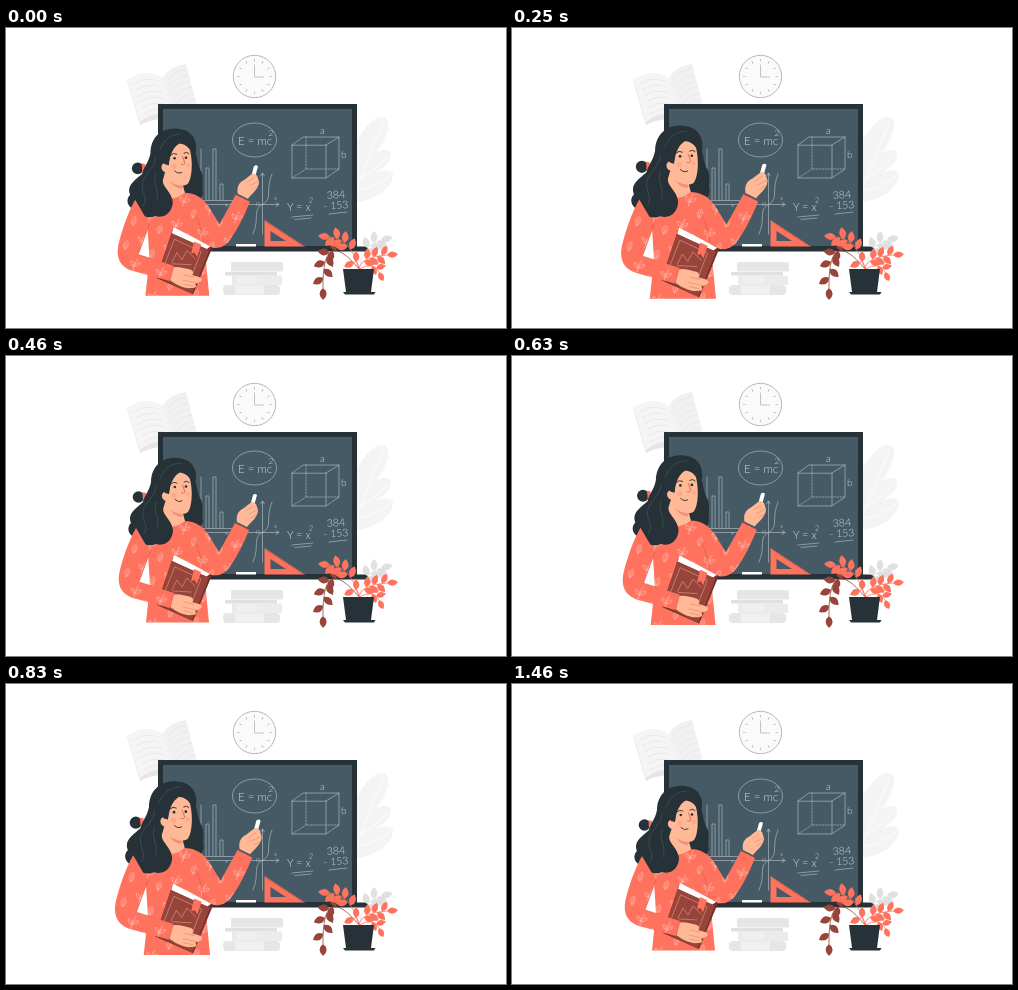
Write an HTML page that moves like this. It is 500 by 300 pixels and loops after 1500 ms.

```html
<!DOCTYPE html>
<html lang="en">
<head>
<meta charset="utf-8">
<title>Teacher at the blackboard</title>
<style>
html, body { margin: 0; width: 100%; height: 100%; overflow: hidden; background: #fff; }
svg { display: block; width: 500px; height: 300px; }
path { stroke-linecap: round; stroke-linejoin: round; }
text { font-family: Lato, sans-serif; font-weight: 300; }
.line { fill: none; }
.skin { fill: #ffb997; }
.fold { fill: none; stroke: #e98c72; stroke-width: .7; }
.seam { fill: none; stroke: #d95a49; stroke-width: .6; }
.dark { fill: #263238; }
.coral { fill: #ff725e; }
</style>
</head>
<body>
<svg viewBox="0 0 500 300">
  <defs>
    <path id="leaf" d="M0 0Q.45-.58 1 0Q.45.58 0 0"/>
    <pattern id="print" width="27" height="25" patternUnits="userSpaceOnUse" patternTransform="rotate(18)">
      <path class="line" stroke="#ffc2b6" stroke-width=".65"
        d="M7 15Q6 8 8 3M7 11Q2 11 2 7Q6 7 7 11Q12 10 12 6Q8 6 7 11M20 23Q15 19 20 14Q24 19 20 23V17"/>
    </pattern>
    <path id="torso" d="M133 173C144 165 158 166 178 165C190 165 197 171 202 178L213 196L229 167L243 174C237 189 231 201 223 212C216 221 207 221 198 216L203 266.500H140L144 229L142 198Z"/>
    <path id="sleeve" d="M130 172C123 184 117 202 114 214C110 230 116 238 127 242L164 252L168 237L133 226L144 196Z"/>
  </defs>

  <!-- open book -->
  <path fill="#e6e6e6" d="M121 53L134 97Q148 89 166 92L160 54Z"/>
  <path fill="#f5f5f5" d="M121 52Q140 39 157 50L168 88Q150 81 134 94Z"/>
  <path fill="#f1f1f1" d="M157 50Q163 38 180 36L191 78L168 88Z"/>
  <g id="pages" class="line" stroke="#e4e4e4" stroke-width=".7"></g>

  <!-- clock -->
  <circle cx="248.5" cy="48.5" r="21.2" fill="#fafafa" stroke="#b0b0b0" stroke-width=".9"/>
  <circle cx="248.5" cy="48.5" r="16.2" class="line" stroke="#999" stroke-width="2.4" pathLength="120" stroke-dasharray=".7 9.3" stroke-dashoffset=".35"/>
  <path class="line" stroke="#bbb" stroke-width=".9" d="M248.500 37V49H257.500"/>

  <!-- large pale leaf -->
  <path fill="#f4f4f4" d="M350 112C358 105 362 91 375 89C385 89 386 102 370 125C378 120 385 121 385 127C384 136 375 142 367 146C377 141 387 141 387 147C386 160 370 172 350 174Z"/>
  <path class="line" stroke="#fff" stroke-width=".8" d="M350 160Q363 130 377 95M354 150Q373 141 381 128M350 163Q373 158 384 148"/>

  <!-- blackboard -->
  <path class="dark" d="M152 76H351V218.500H362V223.500H152Z"/>
  <path fill="#455a64" d="M157 81H346V218H157Z"/>
  <g class="line" stroke="#bac5ca" stroke-width=".6">
    <ellipse cx="248.5" cy="112" rx="22" ry="17"/>
    <path d="M286 117L297 109H333L320 117ZV150H320V117M320 150L333 141V109"/>
    <path stroke-dasharray="1.5 1.5" d="M300 109V141H333M300 141L286 150"/>
    <path d="M195 121V172.500H229M200 172v-32h3v32m4 0v-51h3v51m4 0v-16h3v16"/>
    <path d="M196 176.500H273l-3-2m3 2l-3 2M256.500 206V145l-2 3m2-3l2 3"/>
    <path d="M247 206C254 190 246 182 256.500 176.500S259 163 266 146"/>
    <path d="M286 189l21-2M289 191.500l16-1.500M323 186l18-2"/>
  </g>
  <g fill="#cfd8dc">
    <text x="232" y="116.500" font-size="11.500">E = mc</text>
    <text x="262.500" y="108" font-size="8.500">2</text>
    <text x="314" y="106" font-size="10">a</text>
    <text x="335" y="130" font-size="10">b</text>
    <text x="281" y="183" font-size="11">Y = x</text>
    <text x="303" y="175" font-size="7">2</text>
    <g transform="rotate(-4 321 171)" font-size="10.500"><text x="321" y="171">384</text><text x="317" y="181.500">- 153</text></g>
    <g font-size="6.500"><text x="268" y="172">x</text><text x="219" y="179">x</text><text x="250" y="178">0</text><text x="192" y="179">0</text></g>
  </g>
  <path fill="#fff" d="M230 216H250V218.500H230Z"/>
  <path class="coral" fill-rule="evenodd" d="M258.500 192V218.500H299ZM264.500 203V213H280Z"/>
  <path class="line" stroke="#b04a3d" stroke-width=".7" stroke-dasharray=".7 1.7" d="M260 194L297 218"/>

  <!-- stack of books -->
  <g fill="#e6e6e6">
    <rect x="225" y="234" width="52" height="9.5" rx="1.5"/>
    <rect x="219" y="244" width="52" height="3.5" rx="1" fill="#e0e0e0"/>
    <rect x="226" y="247.5" width="50" height="9.5" rx="1.5" fill="#ebebeb"/>
    <rect x="217" y="257" width="57" height="10" rx="4"/>
    <path fill="#f0f0f0" d="M229 257.500H258V266.500H229ZM231 249H252V255H231Z"/>
  </g>

  <!-- potted plant -->
  <g id="plant"></g>
  <path class="dark" d="M337 241H368L365 264H369.500L368 266.500H339L337 264H340Z"/>

  <g id="teacher">
    <!-- torso and writing arm -->
    <path class="dark" d="M182 116C192 122 190 134 194 142C199 150 195 157 197 165C195 174 187 178 174 179L160 150Z"/>
    <use href="#torso" class="coral"/>
    <use href="#torso" fill="url(#print)"/>
    <path class="seam" d="M198 216C195 202 193 192 189 186M229 167L243 174"/>
    <path class="skin" d="M231 166C230 159 232 155 238 152L243 148Q247 145 250 148L252 154C252 161 246 165 241 171Z"/>
    <path fill="#fff" d="M247 139Q249 137 251 139L248 150H244Z"/>
    <path class="skin" d="M238 153L246 146Q251 146 248 150L242 157Z"/>
    <path class="fold" d="M240 155l7-5M243 158l8-4M245 162l5-3"/>

    <!-- head -->
    <path class="skin" d="M158 143L155 167Q166 175 179 165L175 150Z"/>
    <path fill="#f0917b" d="M164 153Q168 158 177 157L176 161Q168 161 164 153Z"/>
    <circle class="dark" cx="132.500" cy="141" r="5.800"/>
    <path class="coral" d="M136.500 136L140 137L139.500 145L137 145Z"/>
    <path class="dark" d="M156 105C163 100 185 99 189 114C191 120 190 126 188 130L182 121L166 120C167 134 160 141 158 150C154 158 166 163 167 174C167 183 160 191 150 188C139 192 134 185 135 182C124 183 119 173 125 167C121 157 131 152 137 146C139 138 143 136 145 126C145 117 149 109 156 105Z"/>
    <path class="skin" d="M165 119C171 114 181 117 184 123C187 135 186 151 182 156C178 160 168 158 163 150L160 145C154 143 155 135 160 136L163 138Z"/>
    <path class="dark" d="M159 137C155 122 160 111 172 108C184 106 191 117 188 131C186 124 183 119 177 115C171 117 165 122 163 138Z"/>
    <path class="line" stroke="#455a64" stroke-width=".6" d="M154 123Q160 107 175 107M150 130C150 141 138 146 137 156S143 169 138 178M150 146C146 154 155 163 151 173"/>
    <g fill="#ff9a84" opacity=".55"><circle cx="168" cy="139" r="2.600"/><circle cx="182" cy="138" r="2"/></g>
    <g class="line" stroke="#263238" stroke-width=".9">
      <path d="M164.500 128Q168 125 171 127M178 126Q181 124 183 126.500M169 143.500Q172 147 176 145"/>
      <path stroke="#d86957" d="M176.500 129L179 136Q178 138 175.500 137"/>
    </g>
    <g class="dark"><circle cx="168.800" cy="131" r="1.300"/><circle cx="180" cy="130.500" r="1.300"/></g>

    <!-- held book -->
    <path fill="#722f28" d="M167 201L206 219L187 265L151 249Z"/>
    <path fill="#fff" d="M168 199Q186 208 204 218L200 221L166 205Z"/>
    <path fill="#97443a" d="M166 205L203 221.500L186 264.500L151 247.500Z"/>
    <path class="line" stroke="#e79a8c" stroke-width=".6" d="M169 211L195 223L184 251L158 239ZM166 234l5-10l5 7l5-9l8 8M167 235l18 1"/>
    <path class="coral" d="M188 213L195 216L191 228L188.500 224L185 225Z"/>

    <!-- holding arm -->
    <path class="skin" d="M164 239C171 237 178 239 185 241Q189 244 186 246L193 248Q198 250 194 253L189 255Q192 259 186 259C178 260 169 255 163 250Z"/>
    <path class="fold" d="M178 246l10 2M177 251l13 3M178 255l9 2"/>
    <use href="#sleeve" class="coral"/>
    <use href="#sleeve" fill="url(#print)"/>
    <path class="seam" d="M144 196L133 226L146 230M168 237L164 252"/>
  </g>
</svg>
<script>
const $ = id => document.getElementById(id);

for (let row = 0; row < 6; row++) {
  $('pages').innerHTML += `<path d="M${128 + row * 2} ${56 + row * 6}q12-8 25-3m9-2q6-8 18-10"/>`;
}

// A curved stem with leaves on alternating sides and one at its tip
function branch(color, count, size, [x0, y0], [x1, y1], [x2, y2]) {
  let markup = `<path class="line" stroke="${color}" stroke-width=".8" d="M${x0} ${y0}Q${x1} ${y1} ${x2} ${y2}"/>`;
  for (let i = 1; i <= count; i++) {
    const t = 0.3 + 0.7 * i / count, u = 1 - t;
    const x = u * u * x0 + 2 * u * t * x1 + t * t * x2;
    const y = u * u * y0 + 2 * u * t * y1 + t * t * y2;
    const heading = Math.atan2(u * (y1 - y0) + t * (y2 - y1), u * (x1 - x0) + t * (x2 - x1)) * 180 / Math.PI;
    const side = i === count ? 0 : i % 2 ? 1 : -1;
    markup += `<use href="#leaf" fill="${color}" transform="translate(${x} ${y}) rotate(${heading + side * 55}) scale(${size})"/>`;
  }
  $('plant').innerHTML += markup;
}

const CORAL = '#ff725e', BROWN = '#97443a', PALE = '#e0e0e0', pot = [353, 241];
branch(PALE, 6, 12, pot, [358, 216], [375, 212]);
branch(BROWN, 8, 12, pot, [316, 196], [317, 260]);
branch(CORAL, 7, 12, pot, [345, 211], [324, 209]);
branch(CORAL, 7, 11, pot, [354, 229], [381, 227]);
branch(CORAL, 3, 10, pot, [368, 233], [373, 244]);
branch(CORAL, 2, 11, pot, [352, 232], [348, 234]);

const LOOP = 1500, FPS = 24, PHASE = 25, GROWTH = 0.088;

// Quick rise, slower fall
const beat = (t, rise, fall) =>
  t <= 0 || t >= rise + fall ? 0 : t < rise ? t / rise : 1 - (t - rise) / fall;

function draw() {
  const step = Math.floor(performance.now() % LOOP * FPS / 1000 + 0.1);
  const t = step * 1000 / FPS % LOOP + PHASE;
  const scale = 1 + GROWTH * (beat(t, 150, 300) + beat(t - 600, 150, 275));
  $('teacher').setAttribute('transform', `translate(183 184) scale(${scale}) translate(-183 -184)`);
  requestAnimationFrame(draw);
}
draw();
</script>
</body>
</html>
```
